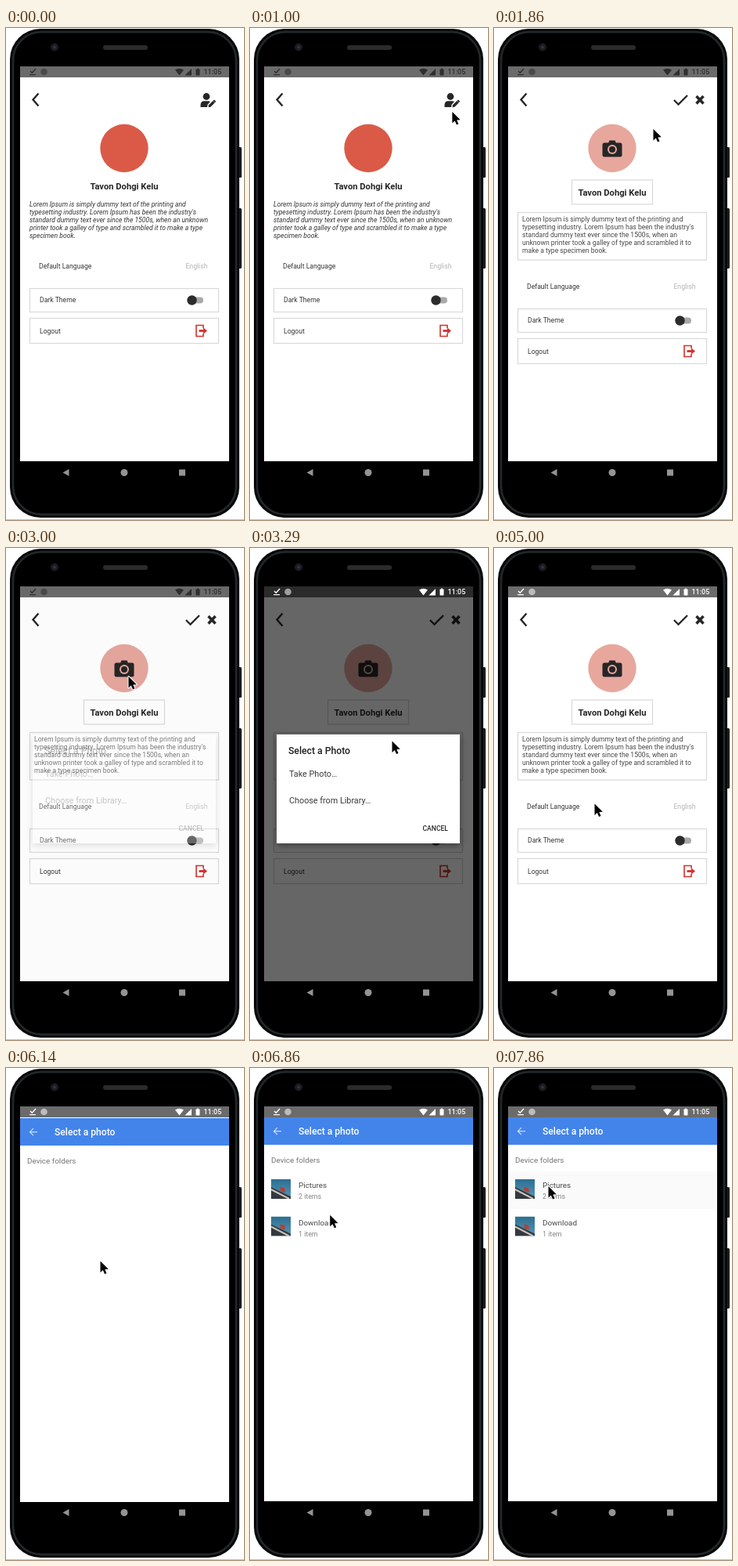
An HTML page with a canvas that plays this animation: 304 by 628 pixels, repeating every 8000 ms.

```html
<!DOCTYPE html>
<html lang="en">
<head>
<meta charset="utf-8">
<title>Profile photo picker</title>
<style>
html, body { margin: 0; width: 100%; height: 100%; overflow: hidden; background: #fff; }
canvas { display: block; width: 304px; height: 628px; }
</style>
</head>
<body>
<canvas id="stage"></canvas>
<script>
const W = 304, H = 628, LOOP = 8000, RATE = 7;
const SCREEN = { x: 18, y: 49, w: 267, h: 504 };
const canvas = document.getElementById('stage');
const ctx = canvas.getContext('2d');
const scale = window.devicePixelRatio || 1;
canvas.width = W * scale;
canvas.height = H * scale;

const INK = '#262626', RED = '#d4302b', CORAL = '#da5a47';
const NAME = 'Tavon Dohgi Kelu';
const BIO_VIEW = [
  'Lorem Ipsum is simply dummy text of the printing and',
  "typesetting industry. Lorem Ipsum has been the industry's",
  'standard dummy text ever since the 1500s, when an unknown',
  'printer took a galley of type and scrambled it to make a type',
  'specimen book.'
];
const BIO_EDIT = [
  'Lorem Ipsum is simply dummy text of the printing and',
  "typesetting industry. Lorem Ipsum has been the industry's",
  'standard dummy text ever since the 1500s, when an',
  'unknown printer took a galley of type and scrambled it to',
  'make a type specimen book.'
];

const EDIT = 9, DIALOG_IN = 21, DIALOG_OUT = 32, PICKER = 40, FOLDERS = 48, HOVER = 50;

// step, x, y of the pointer tip
const POINTER = [
  [1, 281, 379], [8, 257, 91], [12, 257, 91], [13, 203.5, 129],
  [17, 156.5, 164], [21, 156.5, 164], [23, 181.5, 246.5], [28, 128.5, 326.5],
  [40, 128.5, 326.5], [43, 120.5, 246.5], [47, 106, 192], [52, 69.5, 151], [56, 69.5, 151]
];

function rect(x, y, w, h, fill) {
  ctx.fillStyle = fill;
  ctx.fillRect(x, y, w, h);
}

function round(x, y, w, h, r, fill) {
  ctx.beginPath();
  ctx.roundRect(x, y, w, h, r);
  ctx.fillStyle = fill;
  ctx.fill();
}

function disc(x, y, r, fill) {
  ctx.beginPath();
  ctx.arc(x, y, r, 0, Math.PI * 2);
  ctx.fillStyle = fill;
  ctx.fill();
}

function trace(points) {
  ctx.beginPath();
  points.forEach(([x, y], i) => i ? ctx.lineTo(x, y) : ctx.moveTo(x, y));
}

function shape(points, fill) {
  trace(points);
  ctx.closePath();
  ctx.fillStyle = fill;
  ctx.fill();
}

function line(points, color, width, cap = 'butt') {
  trace(points);
  ctx.strokeStyle = color;
  ctx.lineWidth = width;
  ctx.lineCap = cap;
  ctx.stroke();
}

function text(str, x, y, size, color, style = '', align = 'left') {
  ctx.font = `${style} ${size}px Roboto, sans-serif`;
  ctx.textAlign = align;
  ctx.fillStyle = color;
  ctx.fillText(str, x, y);
}

function frame(x, y, w, h) {
  ctx.strokeStyle = '#d9d9d9';
  ctx.lineWidth = 1.2;
  ctx.strokeRect(x + 0.5, y + 0.5, w - 1, h - 1);
}

function drawPhone() {
  rect(0, 0, W, H, '#fff');
  rect(0, 627, W, 1, '#c4c4c4');
  round(296, 152, 5, 39, 1.5, '#1b1e1f');
  round(296, 230, 5, 77, 1.5, '#1b1e1f');
  round(5, 1, 293, 624, 39, '#050606');
  ctx.beginPath();
  ctx.roundRect(9, 5, 285, 616, 36);
  ctx.strokeStyle = '#23282a';
  ctx.lineWidth = 2.5;
  ctx.stroke();
  round(11, 7, 281, 612, 34, '#000');
  round(124, 22, 57, 6, 3, '#2b2b2b');
  disc(62, 24.5, 5, '#1b1c20');
  disc(62, 24.5, 2, '#303440');
  shape([[72.5, 567.5], [80.5, 563], [80.5, 572]], '#949494');
  disc(151, 567.5, 4.5, '#949494');
  rect(221, 563.5, 8, 8, '#949494');
}

function drawStatusIcons(color) {
  line([[31, 55], [33.3, 57.3], [38, 52]], color, 1.4);
  rect(30, 59, 8, 1.2, color);
  ctx.globalAlpha = 0.55;
  disc(48.5, 56, 4.3, color);
  ctx.globalAlpha = 1;
  ctx.beginPath();
  ctx.moveTo(221.5, 60.5);
  ctx.lineTo(216, 53.6);
  ctx.quadraticCurveTo(221.5, 49.8, 227, 53.6);
  ctx.fillStyle = color;
  ctx.fill();
  shape([[228.5, 60.5], [237, 60.5], [237, 52]], color);
  round(242.5, 52.5, 5, 8, 0.7, color);
  rect(244, 51.5, 2, 1.2, color);
  text('11:05', 252.5, 59.3, 9, color, '500');
}

function drawUserEdit() {
  disc(256, 87.5, 4.4, INK);
  ctx.beginPath();
  ctx.moveTo(248.5, 101);
  ctx.lineTo(248.5, 98);
  ctx.quadraticCurveTo(248.8, 93.5, 253, 93.3);
  ctx.lineTo(259, 93.3);
  ctx.lineTo(261, 94);
  ctx.lineTo(257.5, 97.8);
  ctx.lineTo(257, 101);
  ctx.fill();
  shape([[258.5, 101.3], [259, 98.3], [264.2, 93], [266.6, 95.4], [261.4, 100.8]], INK);
  line([[265.2, 92.2], [267.5, 94.5]], INK, 2);
}

function drawCamera(x, y) {
  shape([[x - 5, y - 7], [x - 3.5, y - 10.5], [x + 3.5, y - 10.5], [x + 5, y - 7]], INK);
  round(x - 12.5, y - 7.5, 25, 18, 2.5, INK);
  disc(x, y + 1, 6, '#e7a79d');
  disc(x, y + 1, 4, INK);
}

function drawToggle(y) {
  round(234, y - 4, 18, 8, 4, '#a9a9a9');
  disc(237.5, y, 6.2, '#2c2c2c');
}

function drawLogout(y) {
  line([[252, y - 3.5], [252, y - 7], [243, y - 7], [243, y + 7], [252, y + 7], [252, y + 3.5]], RED, 1.6);
  rect(246.5, y - 1.4, 6, 2.8, RED);
  shape([[252, y - 4], [257, y], [252, y + 4]], RED);
}

function drawProfile(editing) {
  rect(SCREEN.x, SCREEN.y, SCREEN.w, SCREEN.h, '#fff');
  rect(SCREEN.x, SCREEN.y, SCREEN.w, 14, '#6b6b6b');
  line([[41.5, 83.5], [34.5, 91.5], [41.5, 99.5]], INK, 2.4);

  disc(151, 153.5, 30.7, editing ? '#e7a79d' : CORAL);
  if (editing) {
    line([[230, 92], [235.5, 97.5], [247, 86]], INK, 2.3);
    line([[258.5, 87], [267.5, 96.5]], INK, 3.4);
    line([[267.5, 87], [258.5, 96.5]], INK, 3.4);
    drawCamera(151, 154);
    frame(99, 193.5, 104, 32);
    frame(30, 235, 242, 61.5);
  } else {
    drawUserEdit();
  }

  text(NAME, 151, editing ? 213.7 : 205.8, 11.2, INK, '700', 'center');
  const lines = editing ? BIO_EDIT : BIO_VIEW;
  lines.forEach((s, i) => editing
    ? text(s, 36, 247 + i * 10.1, 8.6, '#484848')
    : text(s, 30, 227.5 + i * 10.1, 8.6, '#333', 'italic'));

  const dy = editing ? 26 : 0;
  text('Default Language', 42, 307.2 + dy, 8.6, '#333');
  text('English', 257.5, 307 + dy, 8.7, '#b3b3b3', '', 'right');
  frame(30, 332 + dy, 242, 31);
  text('Dark Theme', 43, 350.3 + dy, 8.6, '#333');
  drawToggle(347.5 + dy);
  frame(30, 370 + dy, 242, 33);
  text('Logout', 43, 389.5 + dy, 8.6, '#333');
  drawLogout(386.5 + dy);
}

function dialogState(n) {
  if (n < DIALOG_IN || n > DIALOG_OUT + 2) return { alpha: 0, dim: 0 };
  if (n === DIALOG_IN) return { alpha: 0.28, dim: 0.015 };
  if (n === DIALOG_IN + 1) return { alpha: 0.85, dim: 0.36 };
  const out = n - DIALOG_OUT;
  if (out < 0) return { alpha: 1, dim: 0.6 };
  return { alpha: [0.83, 0.25, 0][out], dim: [0.57, 0.3, 0.08][out] };
}

function drawDialog(alpha) {
  ctx.save();
  ctx.globalAlpha = alpha;
  ctx.save();
  ctx.shadowColor = 'rgba(0,0,0,0.4)';
  ctx.shadowBlur = 8 * scale;
  ctx.shadowOffsetY = 3 * scale;
  // Keep the shadow outside the translucent panel
  ctx.beginPath();
  ctx.rect(SCREEN.x, SCREEN.y, SCREEN.w, SCREEN.h);
  ctx.rect(34, 238, 234, 139);
  ctx.clip('evenodd');
  rect(34, 238, 234, 139, '#fff');
  ctx.restore();
  rect(34, 238, 234, 139, '#fff');
  text('Select a Photo', 49, 262.5, 12.2, '#1f1f1f', '500');
  text('Take Photo…', 50, 292, 10.8, '#3a3a3a');
  text('Choose from Library…', 50, 326, 10.8, '#3a3a3a');
  text('CANCEL', 253, 361, 8.6, '#262626', '500', 'right');
  ctx.restore();
}

function drawThumb(x, y) {
  ctx.save();
  ctx.beginPath();
  ctx.rect(x, y, 25, 25);
  ctx.clip();
  const sky = ctx.createLinearGradient(x, y, x, y + 25);
  sky.addColorStop(0, '#2c6f91');
  sky.addColorStop(1, '#5797b5');
  rect(x, y, 25, 25, sky);
  shape([[x, y + 10], [x + 25, y + 22], [x + 25, y + 25], [x, y + 25]], '#34393f');
  line([[x, y + 13], [x + 23, y + 25]], '#c9c4b8', 2);
  shape([[x + 11, y + 10], [x + 17, y + 11], [x + 18, y + 17], [x + 12, y + 15]], '#b53f39');
  ctx.restore();
}

function drawFolder(y, name, count) {
  drawThumb(27, y);
  text(name, 62, y + 11.2, 9.9, '#474747');
  text(count, 62, y + 25, 8.8, '#858585');
}

function drawPicker(n) {
  const k = n - PICKER;
  const top = 63 + Math.round(18 * Math.pow(0.4, k));
  ctx.save();
  ctx.globalAlpha = Math.min(1, 0.35 + 0.45 * k);
  ctx.translate(0, top - 63);
  rect(SCREEN.x, 63, SCREEN.w, 490, '#fff');
  rect(SCREEN.x, 63, SCREEN.w, 35, '#4384ea');
  line([[40, 80.7], [30.5, 80.7]], '#cfe0fa', 1.2);
  line([[35, 76.2], [30.5, 80.7], [35, 85.2]], '#cfe0fa', 1.2);
  text('Select a photo', 62, 85, 12.1, '#fff', '500');
  text('Device folders', 27, 121.3, 9.9, '#757575');
  if (n >= HOVER) rect(SCREEN.x, 132, SCREEN.w, 48, '#fafafa');
  if (n >= FOLDERS) {
    drawFolder(142, 'Pictures', '2 items');
    drawFolder(189.5, 'Download', '1 item');
  }
  ctx.restore();
}

function pointerAt(n) {
  const i = POINTER.findIndex(p => p[0] > n);
  const [n0, x0, y0] = POINTER[i - 1], [n1, x1, y1] = POINTER[i];
  const u = (n - n0) / (n1 - n0);
  const e = u * u * (3 - 2 * u);
  return [x0 + (x1 - x0) * e, y0 + (y1 - y0) * e];
}

function drawPointer(n) {
  if (n < POINTER[0][0]) return;
  const [x, y] = pointerAt(n);
  const arrow = [[0, 0], [0, 14.5], [3.3, 11.5], [5.6, 16.6], [8, 15.5], [5.8, 10.6], [10.3, 10.3]];
  ctx.save();
  ctx.translate(x, y);
  trace(arrow);
  ctx.closePath();
  ctx.lineJoin = 'round';
  ctx.lineWidth = 2;
  ctx.strokeStyle = '#fff';
  ctx.stroke();
  ctx.fillStyle = '#000';
  ctx.fill();
  ctx.restore();
}

function draw(time) {
  const n = Math.floor((time % LOOP + 5) * RATE / 1000) % (LOOP * RATE / 1000);
  ctx.setTransform(scale, 0, 0, scale, 0, 0);
  drawPhone();
  drawProfile(n >= EDIT);
  const { alpha, dim } = dialogState(n);
  if (dim) rect(SCREEN.x, SCREEN.y, SCREEN.w, SCREEN.h, `rgba(0,0,0,${dim})`);
  drawStatusIcons(n > DIALOG_IN ? '#fff' : '#2e2e2e');
  if (alpha) drawDialog(alpha);
  if (n >= PICKER) drawPicker(n);
  drawPointer(n);
}

const start = performance.now();
function tick() {
  draw(performance.now() - start);
  requestAnimationFrame(tick);
}
tick();
</script>
</body>
</html>
```
